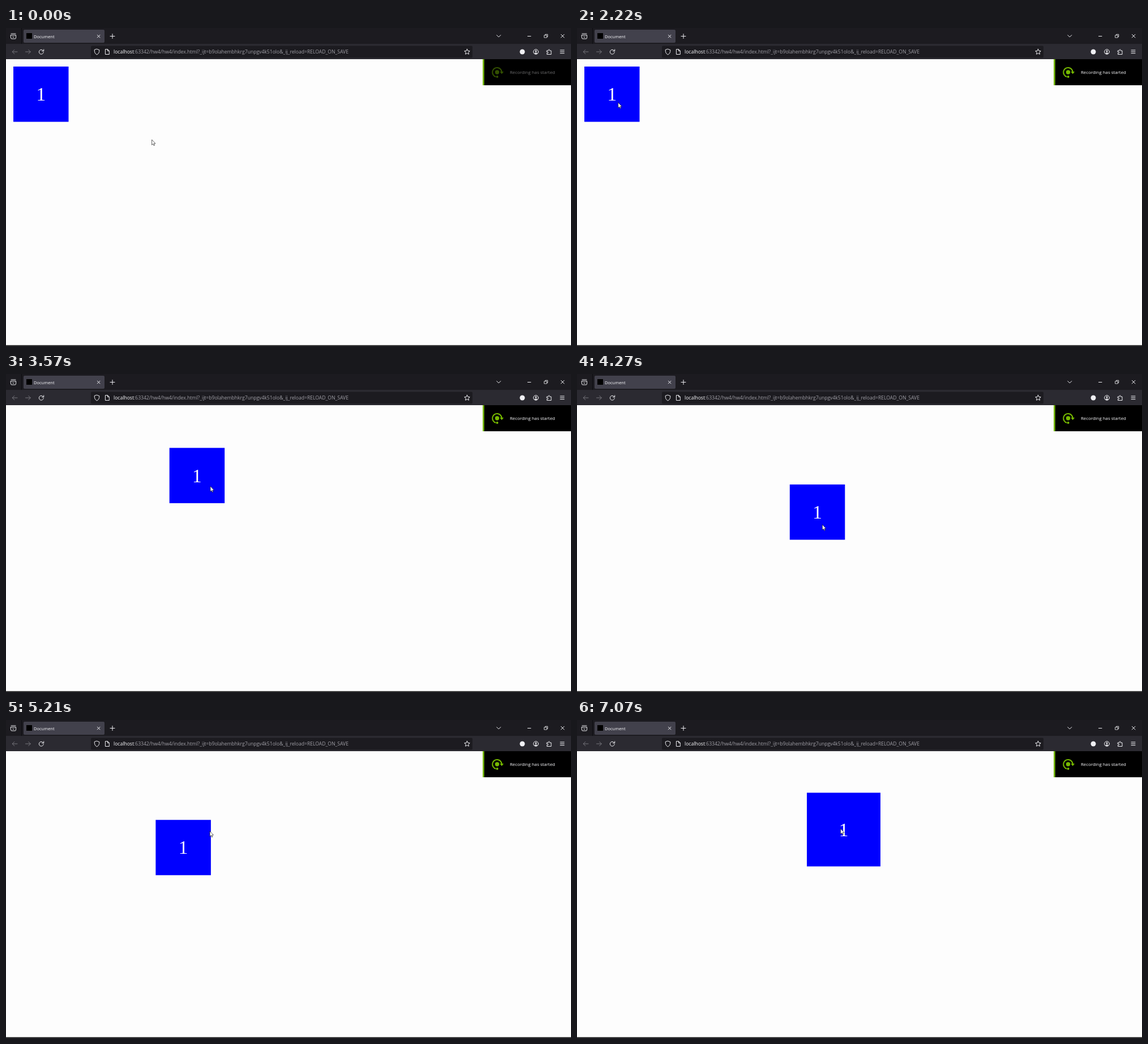
An HTML page that plays this animation: 998x561 px, repeating every 8000 ms.

```html
<!DOCTYPE html>
<html lang="en">
<head>
<meta charset="utf-8">
<title>Document</title>
<style>
  html, body { margin: 0; width: 100%; height: 100%; overflow: hidden; background: #fdfdfd; }
  svg { display: block; width: 998px; height: 561px; }
  text { font-family: "Open Sans", sans-serif; fill: #fbfbfe; }
  .icon { fill: none; stroke: #f0f0f4; stroke-width: 1; stroke-linecap: round; stroke-linejoin: round; }
  .dim { stroke: #77767d; }
</style>
</head>
<body>
<svg viewBox="0 0 998 561">
  <rect width="998" height="561" fill="#fdfdfd"/>
  <rect y="559.6" width="998" height="1.4" fill="#111"/>

  <!-- Tab strip -->
  <rect width="998" height="28" fill="#1c1b20"/>
  <path d="M27.5 0V28" stroke="#0c0c10"/>
  <rect x="31" y="3" width="143" height="23" rx="2" fill="#42414c"/>
  <rect x="36" y="9" width="10" height="10" fill="#000"/>
  <text x="49" y="17.6" font-size="7.5">Document</text>
  <g class="icon">
    <path d="M9 10H17M8.5 12.5H17.5V17.5Q17.5 19 16 19H10Q8.5 19 8.5 17.5ZM11.5 15.2L13 16.5L14.5 15.2"/>
    <path d="M161.3 12.2L166 16.9M166 12.2L161.3 16.9"/>
    <path d="M184 14.5H192M188 10.5V18.5"/>
    <path d="M866.8 12.5L870.3 16L873.8 12.5"/>
    <path d="M921.5 14.5H927"/>
    <path d="M951 12.8H955.3V17H951ZM952.5 12.6V11.2H956.8V15.5H955.5" stroke-width=".8"/>
    <path d="M980.3 11.3L986 17M986 11.3L980.3 17"/>
  </g>

  <!-- Toolbar -->
  <rect y="28" width="998" height="27" fill="#2b2a31"/>
  <rect x="150" y="31.5" width="674" height="21" rx="2" fill="#1c1b20"/>
  <g class="icon">
    <path class="dim" d="M20 42H11.3M14.8 38.4L11.2 42L14.8 45.6"/>
    <path class="dim" d="M34.5 42H43.2M39.7 38.4L43.3 42L39.7 45.6"/>
    <path d="M65.8 40.2A4 4 0 1 0 66.3 42.8M66.7 37.8V40.8H63.7"/>
    <path d="M160.5 37.2L164.8 38.7Q165.2 44.8 160.5 47Q155.8 44.8 156.2 38.7Z"/>
    <path d="M175.8 37.5H179.6L182.3 40.2V46.5H175.8ZM179.4 37.7V40.4H182"/>
    <path id="star"/>
    <circle cx="936" cy="42" r="4.4"/>
    <path d="M955.5 40H958V38.7Q959 36.5 960.2 38.7V40H963V46.5H955.5V44.3H957Q959 43.3 957 42.2H955.5Z"/>
    <path d="M979 39H986M979 41.8H986M979 44.6H986"/>
  </g>
  <circle cx="936" cy="40.7" r="1.5" fill="#f0f0f4"/>
  <path d="M933.2 44.5Q936 41.8 938.8 44.5L936 46Z" fill="#f0f0f4"/>
  <circle cx="912" cy="42" r="4.5" fill="#f0f0f4"/>
  <text x="190" y="45.4" font-size="8.58">localhost<tspan fill="#a09fa6">:63342/hw4/hw4/index.html?_ijt=b9olahembhkrg7unpgv4k51olo&amp;_ij_reload=RELOAD_ON_SAVE</tspan></text>

  <!-- Notification -->
  <rect x="842" y="55" width="156" height="46" fill="#000"/>
  <rect x="842" y="55" width="2.7" height="46" fill="#76b900"/>
  <g id="notice">
    <path d="M865.2 86A8.2 8.2 0 1 1 875.6 78" fill="none" stroke="#76b900" stroke-width="2"/>
    <path d="M872.3 77H879L875.7 81.2Z" fill="#76b900"/>
    <circle cx="867.5" cy="78" r="3.7" fill="#76b900"/>
    <circle cx="867.6" cy="86" r="2" fill="#76b900"/>
    <text x="890" y="81.4" font-size="7.86">Recording has started</text>
  </g>

  <!-- Draggable box and pointer -->
  <rect id="box" fill="#00f"/>
  <text id="digit" text-anchor="middle" style="font:33.3px 'Liberation Serif', serif; fill:#fff">1</text>
  <path id="pointer" d="M0 0V9.3L2.1 7.4L3.5 10.5L4.9 9.9L3.6 6.9H6.4Z" fill="#fff" stroke="#111" stroke-width=".65"/>
</svg>
<script>
  const LOOP = 8000, LAG = 70, SIZE = 97.5, GROWN = 130;
  const el = id => document.getElementById(id);

  // Keys are [time, x, y].
  const approach = [[0, 257.6, 197], [820, 166, 183.5], [1560, 72.6, 131.5]];
  const drag = [
    [2280, 13, 68], [2500, 52, 76], [3010, 179, 99], [3570, 288.5, 130.3],
    [3850, 334, 150], [4270, 375.8, 194.8], [4690, 333, 237], [4790, 308, 241],
    [5000, 242, 228], [5110, 236, 209], [5210, 264, 176.7], [5280, 300, 133],
    [5380, 344, 113], [5530, 383, 118], [5770, 406, 128.3]
  ];

  const clamp01 = v => Math.min(1, Math.max(0, v));

  // Cubic Hermite path through the keys, at rest on both ends.
  function along(keys, t) {
    const last = keys.length - 1;
    if (t <= keys[0][0]) return keys[0].slice(1);
    if (t >= keys[last][0]) return keys[last].slice(1);
    const i = keys.findIndex(k => k[0] > t) - 1;
    const a = keys[i], b = keys[i + 1], span = b[0] - a[0], u = (t - a[0]) / span;
    const slope = (j, axis) => j === 0 || j === last ? 0 :
      (keys[j + 1][axis] - keys[j - 1][axis]) / (keys[j + 1][0] - keys[j - 1][0]);
    return [1, 2].map(axis => {
      const ease = u * u * (3 - 2 * u);
      return a[axis] + (b[axis] - a[axis]) * ease
        + span * u * (1 - u) * ((1 - u) * slope(i, axis) - u * slope(i + 1, axis));
    });
  }

  function draw(t) {
    const [x, y] = along(drag, t);
    const size = SIZE + (GROWN - SIZE) * clamp01((t - 6890) / 180);
    const set = (id, attrs) => Object.entries(attrs).forEach(([k, v]) => el(id).setAttribute(k, v));
    set("box", { x, y, width: size, height: size });
    set("digit", { x: x + size / 2, y: y + size / 2 + 11.4 });

    // The pointer runs slightly ahead of the box it drags.
    const lead = along(drag, t + LAG);
    const [px, py] = t < 2000 ? along(approach, t) : [lead[0] + 59.6, lead[1] + 63.5];
    set("pointer", { transform: `translate(${px} ${py})` });

    const fade = clamp01(t / 850);
    set("notice", { opacity: 0.43 + 0.57 * fade * (2 - fade) });
  }

  const starPoints = Array.from({ length: 10 }, (_, i) => {
    const r = i % 2 ? 2.4 : 5, a = i * Math.PI / 5 - Math.PI / 2;
    return `${814.5 + r * Math.cos(a)} ${42.2 + r * Math.sin(a)}`;
  });
  el("star").setAttribute("d", `M${starPoints.join("L")}Z`);

  const start = performance.now();
  function tick() {
    draw((performance.now() - start) % LOOP);
    requestAnimationFrame(tick);
  }
  tick();
</script>
</body>
</html>
```
